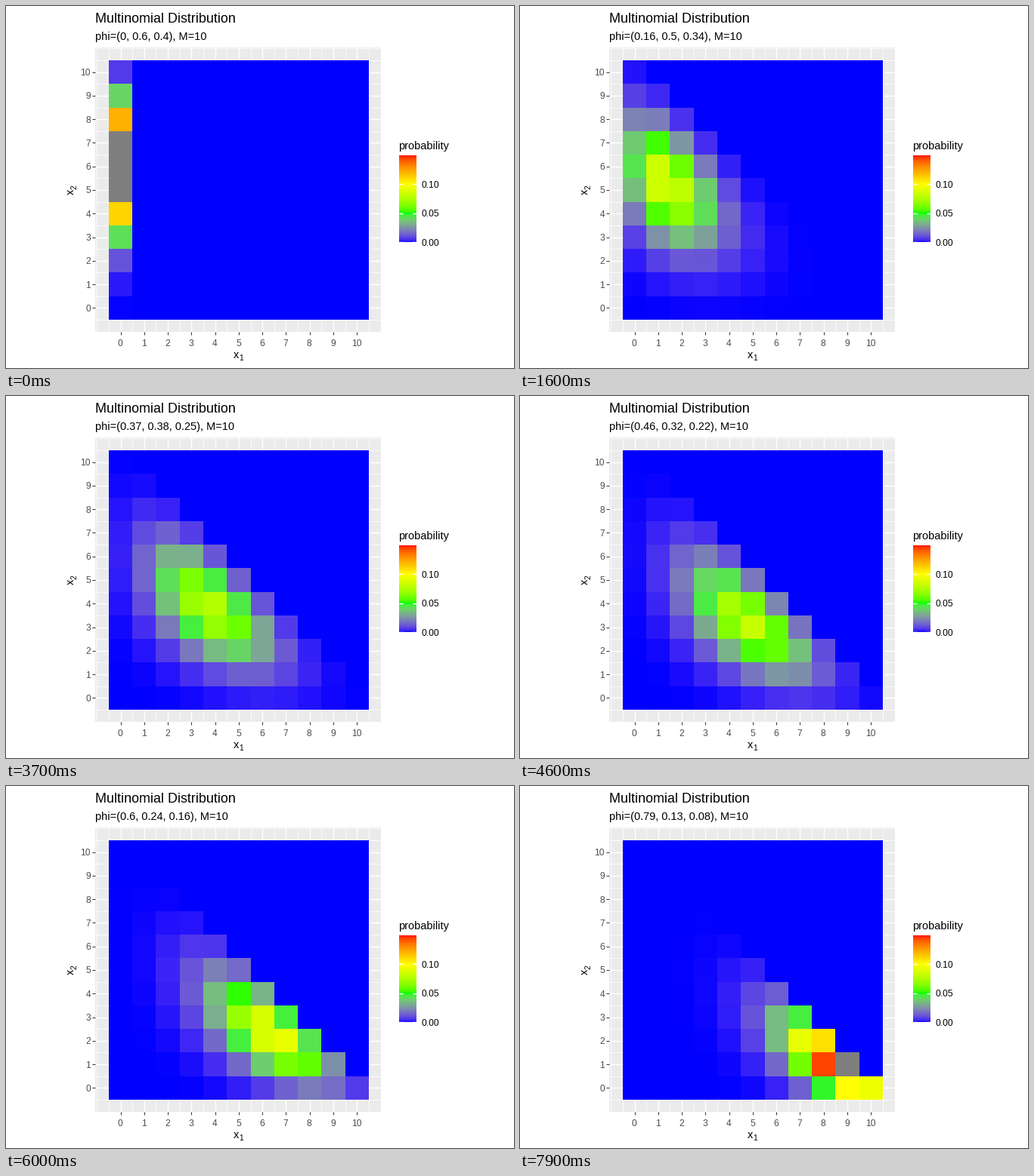
Recreate the animation shown at these times as a matplotlib script. Size 672x480 px, loop 8000 ms.

```python
from math import factorial

import matplotlib.pyplot as plt
import numpy as np
from matplotlib.animation import FuncAnimation
from matplotlib.patches import Rectangle

W, H, DPI = 672, 480, 96
PX = 72 / DPI                      # points per pixel
M, FRAMES, LIMIT = 10, 80, 0.15
LEFT, TOP, CELL = 135.95, 72, 344 / 11
PANEL = (118, 55, 496, 432)        # x0, y0, x1, y1

plt.rcParams["font.family"] = "Liberation Sans"

# Colour scale: blue, green, yellow, red blended in CIE Lab
STOPS = np.array([[0, 0, 1], [0, 1, 0], [1, 1, 0], [1, 0, 0]], float)
TO_XYZ = np.array([[0.4124564, 0.3575761, 0.1804375],
                   [0.2126729, 0.7151522, 0.0721750],
                   [0.0193339, 0.1191920, 0.9503041]])
WHITE = TO_XYZ.sum(axis=1)


def rgb_to_lab(rgb):
    lin = np.where(rgb > 0.04045, ((rgb + 0.055) / 1.055) ** 2.4, rgb / 12.92)
    t = lin @ TO_XYZ.T / WHITE
    f = np.where(t > 0.008856, np.cbrt(t), 7.787 * t + 16 / 116)
    x, y, z = np.moveaxis(f, -1, 0)
    return np.stack([116 * y - 16, 500 * (x - y), 200 * (y - z)], axis=-1)


def lab_to_rgb(lab):
    y = (lab[..., 0] + 16) / 116
    f = np.stack([y + lab[..., 1] / 500, y, y - lab[..., 2] / 200], axis=-1)
    t = np.where(f ** 3 > 0.008856, f ** 3, (f - 16 / 116) / 7.787)
    lin = np.clip((t * WHITE) @ np.linalg.inv(TO_XYZ).T, 0, 1)
    rgb = np.where(lin > 0.0031308, 1.055 * lin ** (1 / 2.4) - 0.055, 12.92 * lin)
    return np.clip(rgb, 0, 1)


STOPS_LAB = rgb_to_lab(STOPS)


def fill(p):
    """Colour for each probability; grey above the limit."""
    at = np.linspace(0, LIMIT, len(STOPS))
    lab = np.stack([np.interp(p, at, STOPS_LAB[:, k]) for k in range(3)], axis=-1)
    rgb = lab_to_rgb(lab)
    rgb[p > LIMIT] = 127 / 255
    return rgb


def weights(i):
    p1 = i / 100
    return p1, (1 - p1) * 0.6, (1 - p1) * 0.4


def density(phi):
    """Multinomial probabilities, rows x2 = 10..0, columns x1 = 0..10."""
    p = np.zeros((M + 1, M + 1))
    for a in range(M + 1):
        for b in range(M + 1 - a):
            c = M - a - b
            ways = factorial(M) // (factorial(a) * factorial(b) * factorial(c))
            p[M - b, a] = ways * phi[0] ** a * phi[1] ** b * phi[2] ** c
    return p


fig = plt.figure(figsize=(W / DPI, H / DPI), dpi=DPI, facecolor="white")
ax = fig.add_axes([0, 0, 1, 1])
ax.set_xlim(0, W)
ax.set_ylim(H, 0)
ax.axis("off")


def text(x, y, s, px, color="black", ha="left", rotation=0):
    return ax.text(x, y, s, fontsize=px * PX, color=color, ha=ha, va="baseline",
                   rotation=rotation, rotation_mode="anchor")


def line(x0, y0, x1, y1, px, color="white", z=2):
    ax.plot([x0, x1], [y0, y1], color=color, lw=px * PX,
            solid_capstyle="butt", zorder=z)


def col(v):
    return LEFT + (v + 0.5) * CELL


def row(v):
    return TOP + (M - v + 0.5) * CELL


# Panel and grid
px0, py0, px1, py1 = PANEL
ax.add_patch(Rectangle((px0, py0), px1 - px0, py1 - py0, fc="#EBEBEB", lw=0, zorder=1))
for k in range(-2, 2 * M + 3):
    v = k / 2
    major = k % 2 == 0 and 0 <= v <= M
    w = 1.42 if major else 0.75
    line(px0, row(v), px1, row(v), w)
    line(col(v), py0, col(v), py1, w)

# Axes
for v in range(M + 1):
    line(col(v), py1, col(v), py1 + 4, 1, "#333333")
    line(px0 - 4, row(v), px0, row(v), 1, "#333333")
    text(col(v) - 0.5, 451, str(v), 12, "#4D4D4D", "center")
    text(112, row(v) + 4.5, str(v), 12, "#4D4D4D", "right")
text(300.7, 467, "x", 14.5)
text(308.3, 470, "1", 10.3)
text(90, 250.2, "x", 14.5, rotation=90)
text(93, 242.6, "2", 10.3, rotation=90)

# Titles
text(118, 22, "Multinomial Distribution", 17.9)
subtitle = text(118, 45, "", 14.5)

# Legend
BAR = (520, 198, 543, 313)
bx0, by0, bx1, by1 = BAR
n = by1 - by0
ramp = LIMIT * (1 - (np.arange(n) + 0.5) / n)
ax.imshow(fill(ramp)[:, None, :], extent=(bx0, bx1, by1, by0), aspect="auto",
          interpolation="nearest", zorder=2)
text(519, 190, "probability", 14.5)
for p in (0, 0.05, 0.1):
    y = by1 - n * p / LIMIT
    line(bx0, y, bx0 + 4.6, y, 1.42, z=3)
    line(bx1 - 4.6, y, bx1, y, 1.42, z=3)
    text(550, y + 4.5, f"{p:.2f}", 12)

# Heat map
edges = np.arange(M + 2) * CELL
tiles = ax.pcolormesh(np.round(LEFT + edges), np.round(TOP + edges),
                      fill(density(weights(0))), antialiased=False,
                      linewidth=0, zorder=4)
ax.set_xlim(0, W)
ax.set_ylim(H, 0)
ax.set_aspect("auto")


def update(i):
    phi = weights(i)
    tiles.set_array(fill(density(phi)))
    subtitle.set_text("phi=(%s), M=%d" % (", ".join(f"{round(p, 2):g}" for p in phi), M))
    return tiles, subtitle


anim = FuncAnimation(fig, update, frames=FRAMES, interval=100, repeat=True,
                     repeat_delay=0, blit=False)
plt.show()
```
